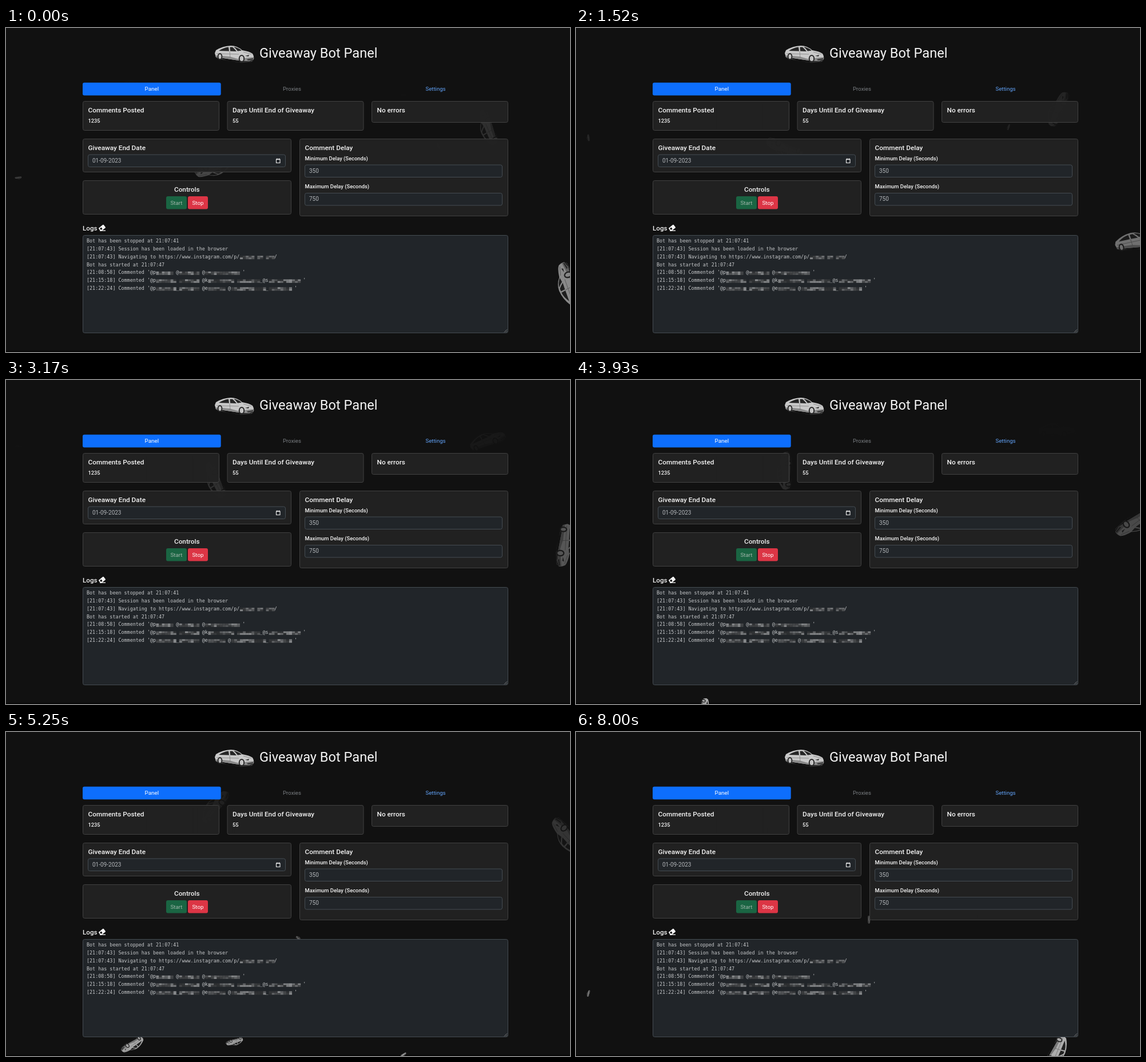
An HTML page that plays this animation: 986 px wide and 568 px high, repeating every 8070 ms.

```html
<!DOCTYPE html>
<html lang="en">
<head>
<meta charset="utf-8">
<title>Giveaway Bot Panel</title>
<style>
  html, body { margin: 0; width: 100%; height: 100%; overflow: hidden; background: #111; }
  svg { display: block; width: 986px; height: 568px; font-family: Roboto, "Open Sans", sans-serif; fill: #f4f4f4; }
  .card { fill: #222; fill-opacity: .95; stroke: #414141; }
  .field { fill: #212529; stroke: #454c52; }
  .strong { font-weight: 500; }
  .log { font: 8.4px "DejaVu Sans Mono", monospace; fill: #c6c8ca; white-space: pre; }
</style>
</head>
<body>
<svg viewBox="0 0 986 568">
  <defs>
    <g id="car">
      <path d="M-34 5L-28 9L6 15L30 13L34 10L31 14L12 15.5L-12 12Z" fill="#4a4a4a"/>
      <path d="M-34-1L-32-6Q-20-13.5-6-14Q5-14 14-6Q27-4 32 0Q35 5 34 10L25 13L8 12L-32 6Z" fill="#c9c9c9"/>
      <path d="M-33 3L-8 5L6 9L34 6V10L25 13L8 12L-32 6Z" fill="#8a8a8a"/>
      <path d="M-27-5Q-18-11-10-11.5L-9-4.5ZM-7.5-11.5L-3-11.5Q1-8 4-4L-7-4.5ZM-1-12Q7-11 13-5.5L6-4.5Q3-9-1-12Z" fill="#252525"/>
      <path d="M-31 0L8 1M-8-4L-7 7M16-3L30 1" stroke="#777" stroke-width=".7" fill="none"/>
      <path d="M19 4L26 2L25 5ZM22 10L33 8V10L24 12Z" fill="#333"/>
      <g fill="#c4c4c4" stroke="#292929" stroke-width="2">
        <ellipse cx="-25" cy="5" rx="3.4" ry="5"/>
        <ellipse cx="13" cy="8.5" rx="4.2" ry="5.6"/>
      </g>
    </g>
  </defs>
  <rect width="986" height="568" fill="#111"/>
  <rect y="566" width="986" height="2" fill="#070707"/>
  <g id="sky"></g>
  <g id="ui"></g>
  <use href="#car" x="399" y="45"/>
  <g transform="translate(168 350.5) rotate(-38)">
    <rect x="-5.5" y="-3.5" width="11" height="7" rx="1.2"/>
    <path d="M-3.8-1.6H-.6V1.6H-3.8Z" fill="#111"/>
  </g>
  <path d="M164 355.3H174" stroke="#f4f4f4" stroke-width="1.3"/>
  <path d="M472.5 230H479V236.5H472.5ZM472.5 230.5H479M474 228.5V230M477.5 228.5V230" fill="none" stroke="#eee" stroke-width="1.1"/>
  <path d="M871 533.5L876 528.5M874 533.5L876 531.5" stroke="#999" stroke-width=".8"/>
</svg>
<script>
const LOOP = 8070, LEFT = 134.5, HALF = 513.5;
const sky = document.getElementById('sky'), ui = document.getElementById('ui');

function add(parent, tag, attrs, text) {
  const el = document.createElementNS('http://www.w3.org/2000/svg', tag);
  for (const k in attrs) el.setAttribute(k, attrs[k]);
  if (text) el.textContent = text;
  parent.append(el);
  return el;
}
const box = (x, y, width, height, attrs) => add(ui, 'rect', { x, y, width, height, rx: 3, ...attrs });
const label = (x, y, size, text, attrs) => add(ui, 'text', { x, y, 'font-size': size, ...attrs }, text);
const centred = (x, y, size, text, attrs) => label(x, y, size, text, { 'text-anchor': 'middle', ...attrs });

function card(x, y, w, h, title) {
  box(x, y, w, h, { class: 'card' });
  label(x + 9, y + 19, 11.8, title, { class: 'strong' });
}
function field(x, y, text) {
  box(x, y, 345, 21.5, { class: 'field' });
  label(x + 7.5, y + 13.5, 10, text, { fill: '#b3b6b9' });
}
function button(x, y, w, text, fill, color) {
  box(x, y, w, 22.5, { fill });
  centred(x + w / 2, y + 14.5, 9.8, text, { fill: color });
}

// Header and tabs
label(443, 52, 23.6, 'Giveaway Bot Panel');
button(134, 95.8, 241.7, 'Panel', '#0d6efd', '#fff');
centred(500, 110.3, 9.7, 'Proxies', { fill: '#7b7f83' });
centred(751, 110.3, 9.6, 'Settings', { fill: '#62a4fa' });

// Cards
['Comments Posted', 'Days Until End of Giveaway', 'No errors'].forEach((title, i) => {
  const x = LEFT + 252.5 * i, value = ['1235', '55'][i];
  card(x, 128.5, 238, value ? 51 : 37, title);
  label(x + 9, 166, 9.3, value, { class: 'strong' });
});
card(LEFT, 194.5, 364, 58, 'Giveaway End Date');
field(LEFT + 9, 222, '01-09-2023');
card(HALF, 194.5, 364, 135, 'Comment Delay');
['Minimum', 'Maximum'].forEach((name, i) => {
  label(HALF + 9, 231.5 + 49 * i, 9.4, name + ' Delay (Seconds)', { class: 'strong' });
  field(HALF + 9, 240 + 49.5 * i, ['350', '750'][i]);
});
card(LEFT, 267.5, 364, 59);
centred(316.3, 287, 11.8, 'Controls', { class: 'strong' });
button(280, 295, 36, 'Start', '#1a6543', '#a2b6ab');
button(318, 295, 35, 'Stop', '#dc3545', '#fff');

// Log: each # is a character hidden by a mosaic
label(134, 354.5, 11.6, 'Logs', { class: 'strong' });
box(LEFT, 363.5, 743, 171, { class: 'field' });
let seed = 7;
const random = () => (seed = seed * 16807 % 2147483647) / 2147483647;
const PITCH = 5.057;
[
  'Bot has been stopped at 21:07:41',
  '[21:07:43] Session has been loaded in the browser',
  '[21:07:43] Navigating to https://www.instagram.com/p/##### ## ###/',
  'Bot has started at 21:07:47',
  "[21:08:58] Commented '@p###### @####### @############ '",
  "[21:15:18] Commented '@p####### ####### @k######### ########_@s########### '",
  "[21:22:24] Commented '@p#######_####### @e###### @############_######## '"
].forEach((line, row) => {
  const y = 376.2 + row * 13.8;
  add(ui, 'text', { x: 141, y, class: 'log' }, line.replace(/#/g, ' '));
  [...line].forEach((char, col) => {
    if (char === '#') for (let part = 0; part < 2; part++) {
      const v = 45 + random() ** 1.5 * 100 | 0;
      add(ui, 'rect', {
        x: 141 + col * PITCH, y: y - 4.5 + part * 3, width: PITCH, height: 3, fill: `rgb(${v},${v + 2},${v + 4})`
      });
    }
  });
});

// Cars rise while turning twice and fading out, each with its own delay and duration in seconds
const WARMUP = 124.8, SLOWDOWN = 1.02, RISE = 565, FLOOR = 683;
const cars = [
  { x: 979, size: 77, delay: 0, duration: 11 },
  { x: 364, size: 68, delay: 7 },
  { x: 841, size: 66, delay: 3.8 },
  { x: 222, size: 44, delay: 0 },
  { x: 400, size: 31, delay: 0, duration: 18 },
  { x: 512.5, size: 14, delay: 15, duration: 45 },
  { x: 21.5, size: 12, delay: 8, duration: 12 },
  { x: 695, size: 11, delay: 0 },
  { x: 756, size: 11, delay: 4 }
].map(car => ({ duration: 25, ...car, el: add(sky, 'use', { href: '#car' }) }));

function draw(t) {
  const seconds = t % LOOP / 1000 / SLOWDOWN + WARMUP;
  for (const { x, size, delay, duration, el } of cars) {
    const p = (seconds - delay) / duration % 1;
    const y = FLOOR - size / 2 - RISE * p;
    el.setAttribute('transform', `translate(${x} ${y}) rotate(${720 * p}) scale(${size / 70})`);
    el.setAttribute('opacity', 1 - p);
  }
}
const start = performance.now();
(function frame() {
  draw(performance.now() - start);
  requestAnimationFrame(frame);
})();
</script>
</body>
</html>
```
